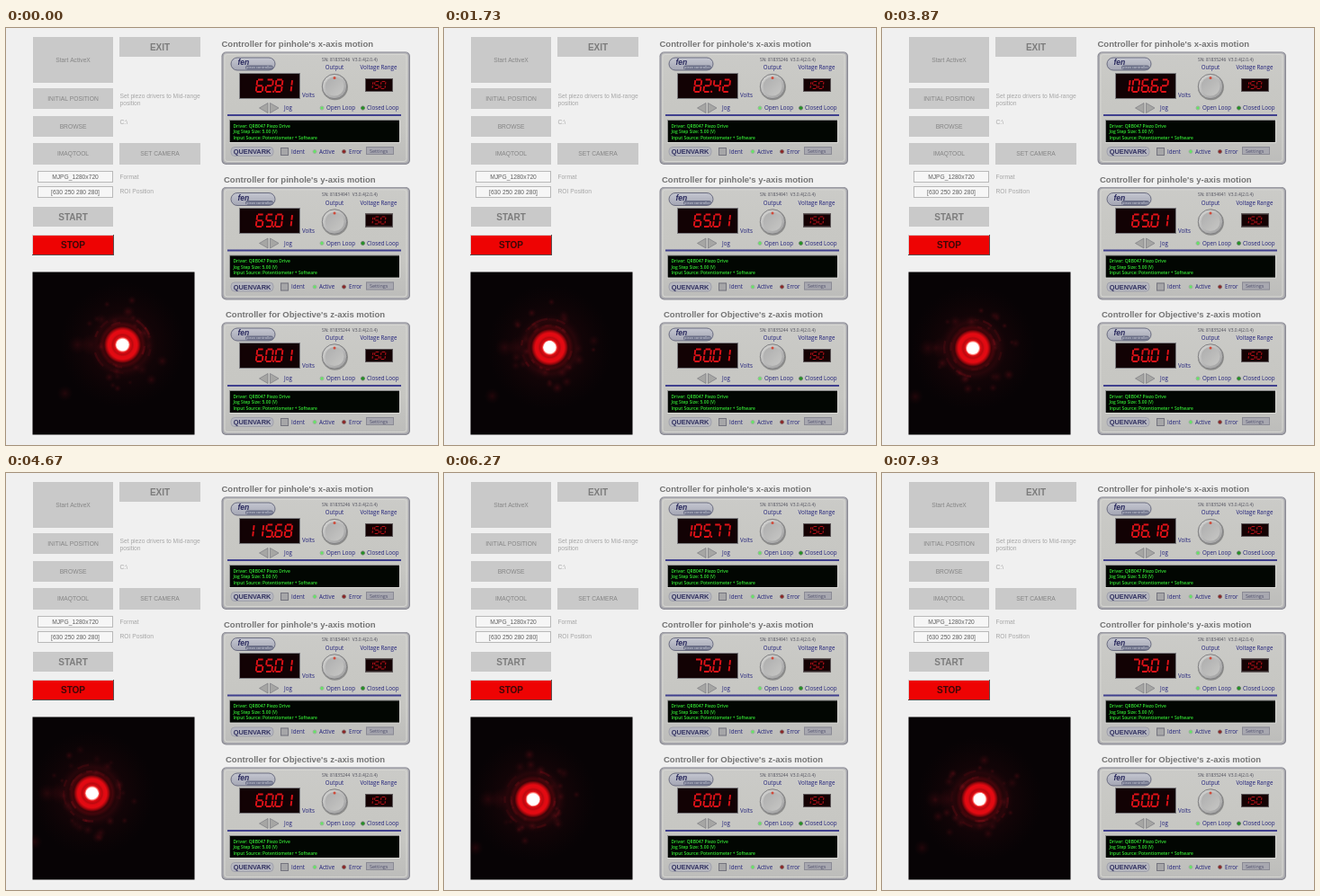
These frames come from a looping animation (480x464 px, 8000 ms). An HTML page with a canvas:

```html
<!DOCTYPE html>
<html lang="en">
<head>
<meta charset="utf-8">
<title>Piezo alignment panel</title>
<style>
html, body { margin: 0; width: 100%; height: 100%; overflow: hidden; background: #f0f0f0; }
canvas { display: block; width: 480px; height: 464px; }
</style>
</head>
<body>
<canvas id="stage" width="480" height="464"></canvas>
<script>
const W = 480, H = 464, LOOP = 8000, STEPS = 120;
const UI = '"Liberation Sans", Arial, sans-serif';
const PANEL = '"Open Sans", "Noto Sans", sans-serif';
const NAVY = '#20207a';
const stage = document.getElementById('stage').getContext('2d');
let g = stage;

function box(x0, y0, x1, y1, fill, stroke) {
  g.fillStyle = fill;
  g.fillRect(x0, y0, x1 - x0, y1 - y0);
  if (stroke) {
    g.strokeStyle = stroke;
    g.lineWidth = 1;
    g.strokeRect(x0 + .5, y0 + .5, x1 - x0 - 1, y1 - y0 - 1);
  }
}

function rounded(x, y, w, h, r, fill, stroke, line = 1) {
  g.beginPath();
  g.roundRect(x, y, w, h, r);
  g.fillStyle = fill;
  g.fill();
  if (stroke) {
    g.strokeStyle = stroke;
    g.lineWidth = line;
    g.stroke();
  }
}

function disc(x, y, r, fill, stroke) {
  g.beginPath();
  g.arc(x, y, r, 0, Math.PI * 2);
  g.fillStyle = fill;
  g.fill();
  if (stroke) {
    g.strokeStyle = stroke;
    g.lineWidth = 1;
    g.stroke();
  }
}

function poly(points, fill, stroke) {
  g.beginPath();
  points.forEach(([x, y]) => g.lineTo(x, y));
  g.closePath();
  g.fillStyle = fill;
  g.fill();
  g.strokeStyle = stroke;
  g.lineWidth = .7;
  g.stroke();
}

function text(s, x, y, font, color, align = 'left') {
  g.font = font;
  g.fillStyle = color;
  g.textAlign = align;
  g.textBaseline = 'alphabetic';
  g.fillText(s, x, y);
}

function ramp(x0, y0, x1, y1, colors) {
  const grad = g.createLinearGradient(x0, y0, x1, y1);
  colors.forEach((c, i) => grad.addColorStop(i / (colors.length - 1), c));
  return grad;
}

function button(label, x0, y0, x1, y1, big) {
  box(x0, y0, x1, y1, '#c9c9c9');
  const size = big ? 10 : 6.7;
  text(label, (x0 + x1) / 2, (y0 + y1) / 2 + size * .37,
    (big ? 'bold ' : '') + size + 'px ' + UI, big ? '#7c7c7c' : '#858585', 'center');
}

function drawControls() {
  const small = '6.7px ' + UI;
  button('Start ActiveX', 30, 10, 119, 61);
  button('EXIT', 126, 10, 216, 32, true);
  button('INITIAL POSITION', 30, 67, 119, 90);
  button('BROWSE', 30, 98, 119, 121);
  button('IMAQTOOL', 30, 128, 119, 152);
  button('SET CAMERA', 126, 128, 216, 152);
  button('START', 30, 199, 119, 221, true);

  [['MJPG_1280x720', 159], ['[630 250 280 280]', 176]].forEach(([s, y]) => {
    box(35, y, 119, y + 13, '#f6f6f6', '#b9b9b9');
    text(s, 77, y + 9, small, '#606060', 'center');
  });
  [['Set piezo drivers to Mid-range', 77.5], ['position', 85.5], ['C:\\', 107],
   ['Format', 167.5], ['ROI Position', 183.5]].forEach(([s, y]) => text(s, 126.5, y, small, '#a6a6a6'));

  box(29, 230, 120, 253, '#5c4c4c');
  box(29, 230, 119, 252, '#d8cccc');
  box(30, 231, 119, 252, '#ee0303');
  text('STOP', 74.5, 245, 'bold 10px ' + UI, '#3c0808', 'center');
}

function drawKnob(x, y) {
  disc(x + .4, y + .8, 14.5, '#8c8c8a');
  disc(x, y, 13.7, ramp(x - 10, y - 12, x + 10, y + 12, ['#d2d2d0', '#bababa', '#a2a2a2']), '#828284');
  disc(x, y, 10.5, ramp(x - 8, y - 8, x + 8, y + 8, ['#b0b0b0', '#c4c4c2']));
  disc(x, y - 9.5, 1.5, '#d04a3a');
}

// y is the top edge of the instrument
function drawPanel(y, serial, knobY) {
  const label = '6.2px ' + PANEL;
  rounded(239.5, y + .5, 209.5, 125.5, 5, '#85858d');
  rounded(241, y + 1.5, 206.5, 123, 4,
    ramp(0, y, 0, y + 125, ['#cbcbc8', '#c8c8c4', '#c6c6c2', '#bcbcba']), '#a2a2aa', 1.5);
  rounded(243, y + 3.5, 202, 119, 3, 'rgba(255,255,255,0)', '#d6d6d2', 1);

  rounded(250, y + 7, 49, 14, 7, ramp(0, y + 7, 0, y + 21, ['#c4c6d0', '#a4a6b4']), '#6a6c80', 1);
  text('fen', 257.5, y + 15, 'italic bold 8.5px ' + UI, '#28285c');
  rounded(266, y + 15.5, 31, 5, 2.5, '#6c7088');
  text('piezo controller', 281.5, y + 19.3, '4px ' + PANEL, '#d4d6e0', 'center');

  text(`SN: ${serial}  V3.0.4(2.0.4)`, 351, y + 10.5, '4.9px ' + PANEL, '#4b4b58');
  text('Output', 365, y + 20, label, NAVY, 'center');
  text('Voltage Range', 414, y + 20, label, NAVY, 'center');
  text('Volts', 329, y + 51, label, NAVY);
  text('Jog', 309, y + 65, label, NAVY);
  text('Open Loop', 356, y + 65, label, NAVY);
  text('Closed Loop', 401, y + 65, label, NAVY);
  disc(351, y + 63, 2, '#62e862', '#9cb09c');
  disc(396.5, y + 63, 2, '#1d961d', '#617b61');
  drawKnob(365, knobY);

  box(399, y + 30, 430, y + 45, '#140203', '#5c5658');
  number('150', 421, y + 33.5, 5, 8, 7, 1.2, '#b01018');

  poly([[281.5, y + 63], [291, y + 57.5], [291, y + 68.5]], '#a6a6a4', '#7c7c82');
  poly([[303, y + 63], [293.5, y + 57.5], [293.5, y + 68.5]], '#a6a6a4', '#7c7c82');

  box(246, y + 70, 439, y + 72, '#40408e');
  box(248, y + 76, 438, y + 102, '#dadad6');
  box(248, y + 76, 437, y + 101, '#8c8c8c');
  box(249, y + 77, 437, y + 101, '#020602');
  ['Driver: QRB047 Piezo Drive', 'Jog Step Size: 5.00 (V)', 'Input Source: Potentiometer + Software']
    .forEach((s, i) => text(s, 252.5, y + 84.5 + i * 6.5, '600 4.9px ' + PANEL, '#34e634'));

  rounded(250, y + 106.5, 47, 10, 4, '#b6b7c0', '#9a9ba6', .8);
  text('QUENVARK', 273.5, y + 114.2, 'bold 7.4px ' + UI, '#30305f', 'center');
  box(305, y + 107, 314, y + 116, '#a6a6a8', '#74747e');
  text('Ident', 317, y + 113.5, label, NAVY);
  disc(343, y + 111.5, 2, '#62e862', '#9cb09c');
  text('Active', 348, y + 113.5, label, NAVY);
  disc(375.5, y + 111.5, 2, '#8e2020', '#806a6a');
  text('Error', 381, y + 113.5, label, NAVY);
  box(400, y + 106, 431, y + 115, '#a8a8b0', '#8a8a94');
  text('Settings', 404, y + 112.5, '5.5px ' + PANEL, '#52526e');
}

// Lit segments per digit: a top, b/c right, d bottom, e/f left, g middle
const LIT = ['abcdef', 'bc', 'abged', 'abgcd', 'fgbc', 'afgcd', 'afgedc', 'abc', 'abcdefg', 'abcdfg'];

function digit(d, x, y, w, h) {
  const m = h / 2, k = .7;
  const seg = {
    a: [k, 0, w - k, 0], g: [k, m, w - k, m], d: [k, h, w - k, h],
    f: [0, k, 0, m - k], b: [w, k, w, m - k],
    e: [0, m + k, 0, h - k], c: [w, m + k, w, h - k]
  };
  const lean = v => (h - v) * .12;
  g.beginPath();
  for (const s of LIT[d]) {
    const [x0, y0, x1, y1] = seg[s];
    g.moveTo(x + x0 + lean(y0), y + y0);
    g.lineTo(x + x1 + lean(y1), y + y1);
  }
  g.stroke();
}

// Right-aligned seven-segment readout
function number(s, right, y, w, h, pitch, line, color) {
  g.strokeStyle = g.fillStyle = color;
  g.lineWidth = line;
  let x = right - w;
  for (const c of [...s].reverse()) {
    if (c === '.') {
      g.fillRect(x + pitch - 2.8, y + h - 1.2, 2, 2);
    } else {
      digit(+c, x, y, w, h);
      x -= pitch;
    }
  }
}

function readout(cy, value) {
  box(259, cy - 14.5, 327, cy + 14.5, '#7c7c80');
  box(260, cy - 13.5, 326, cy + 13.5, '#120204');
  number(value.toFixed(2), 316.5, cy - 7, 7, 13.5, 10.6, 1.9, '#e01218');
}

// Piecewise linear track of [step, value] pairs
function track(keys, n) {
  let i = 1;
  while (i < keys.length - 1 && n > keys[i][0]) i++;
  const [a, va] = keys[i - 1], [b, vb] = keys[i];
  return va + (vb - va) * Math.min(1, Math.max(0, (n - a) / (b - a)));
}

const VOLTS = [[0, 62.81], [26, 82.42], [45, 97.4], [58, 106.62], [75.7, 119.98], [82, 114.98], [106, 96.56], [119, 86.18]];
const SPOT_X = [[0, 129.5], [26, 117.5], [45, 109], [58, 101], [76, 93], [82, 95], [106, 103], [119, 108.5]];
const SPOT_Y = [[0, 352.5], [26, 355.5], [75, 356.5], [78, 363], [119, 363]];
const Y_JUMP = 76;

function randomizer(seed) {
  let s = seed * 7919 + 17;
  return () => (s = (s * 16807 + 11) % 2147483647) / 2147483647;
}

function glow(x, y, r, stops) {
  const grad = g.createRadialGradient(x, y, 0, x, y, r);
  stops.forEach(([at, c]) => grad.addColorStop(at, c));
  g.fillStyle = grad;
  g.fillRect(x - r, y - r, 2 * r, 2 * r);
}

const haze = (x, y, r, alpha) =>
  glow(x, y, r, [[0, `rgba(120,16,26,${alpha})`], [1, 'rgba(60,8,12,0)']]);

const BEAM = [
  [0, '#fff'], [.15, '#fff'], [.18, '#ff7a72'], [.21, '#dc0c13'], [.27, '#bb080e'],
  [.32, '#e00a12'], [.39, '#e40a12'], [.44, '#a8070d'], [.5, '#3c0408'],
  [.56, '#42060b'], [.64, '#220508'], [.72, '#26060a'], [1, 'rgba(8,3,5,0)']
];

function drawCamera(n) {
  const x = track(SPOT_X, n), y = track(SPOT_Y, n), rand = randomizer(n + 1);
  g.save();
  g.beginPath();
  g.rect(29.5, 271.5, 180, 181);
  g.clip();
  box(29, 271, 210, 453, '#070305');
  haze(x, y, 70, .3);
  haze(x - 34, y, 13, .4);
  haze(x - 50, y, 11, .25);
  haze(x - 64, y + 54, 9, .25);
  glow(x, y, 41, BEAM);
  // speckle and broken diffraction rings
  for (let i = 0; i < 26; i++) {
    const a = rand() * Math.PI * 2, r = 23 + rand() * 28;
    haze(x + Math.cos(a) * r, y + Math.sin(a) * r, 3 + rand() * 4, .15 + rand() * .25);
  }
  for (let i = 0; i < 18; i++) {
    const a = rand() * Math.PI * 2, r = (i % 2 ? 24 : 31) + rand();
    g.beginPath();
    g.arc(x, y, r, a, a + .15 + rand() * .35);
    g.strokeStyle = `rgba(140,16,26,${.08 + rand() * .2})`;
    g.lineWidth = 2.4;
    g.stroke();
  }
  // slightly ragged core
  g.beginPath();
  for (let i = 0; i < 14; i++) {
    const a = i * Math.PI / 7, r = 6 + rand() * 1.4;
    g.lineTo(x + Math.cos(a) * r, y + Math.sin(a) * r);
  }
  g.fillStyle = '#fff';
  g.fill();
  g.restore();
}

const fixed = document.createElement('canvas');

function drawFixed() {
  fixed.width = W;
  fixed.height = H;
  g = fixed.getContext('2d');
  box(0, 0, W, H, '#f0f0f0');
  drawControls();
  const title = 'bold 9.5px ' + UI;
  text("Controller for pinhole's x-axis motion", 239.5, 20.5, title, '#747474');
  text("Controller for pinhole's y-axis motion", 242, 171.5, title, '#747474');
  text("Controller for Objective's z-axis motion", 244, 322, title, '#747474');
  drawPanel(26, '81835246', 65);
  drawPanel(176.5, '81834941', 215.5);
  drawPanel(327, '81835244', 365.5);
  readout(364.5, 60.01);
  g = stage;
}

function render(ms) {
  const n = Math.floor((ms % LOOP + 5) * .015) % STEPS;
  g.drawImage(fixed, 0, 0);
  readout(64.5, track(VOLTS, n));
  readout(214.5, n < Y_JUMP ? 65.01 : 75.01);
  drawCamera(n);
}

drawFixed();
const start = performance.now();
function tick() {
  render(performance.now() - start);
  requestAnimationFrame(tick);
}
tick();
</script>
</body>
</html>
```
